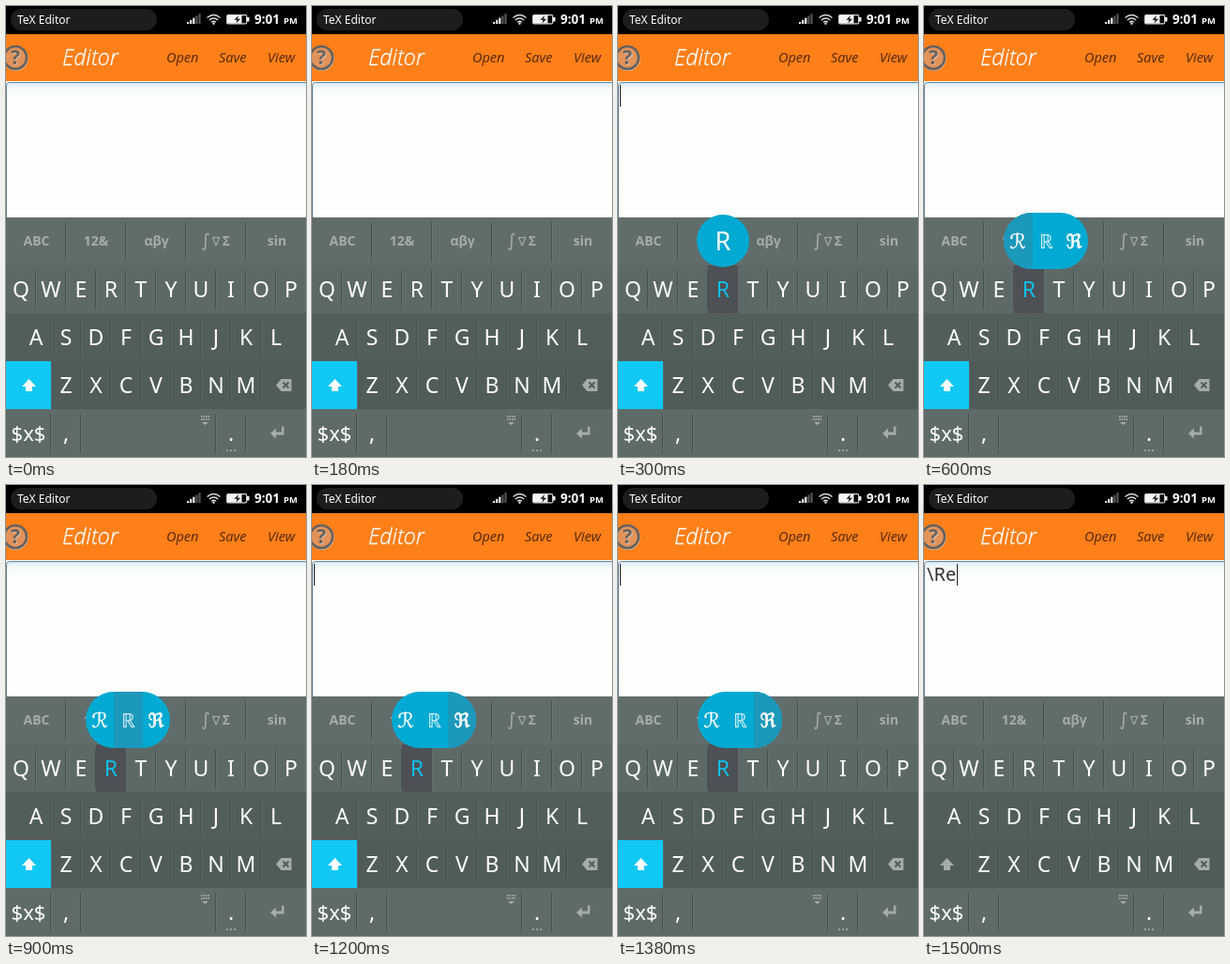
An HTML page that plays this animation: 320 px wide and 480 px high, repeating every 1.8 s.

```html
<!DOCTYPE html>
<html lang="en">
<head>
<meta charset="utf-8">
<title>TeX Editor keyboard</title>
<style>
  html, body { margin: 0; width: 100%; height: 100%; overflow: hidden; background: #000; }
  svg { display: block; width: 320px; height: 480px; }
  text { font-family: "Fira Sans", "Noto Sans", "Open Sans", sans-serif; fill: #fff; white-space: pre; }
  .mid { text-anchor: middle; }
  .key { font-size: 23px; }
  .tab { font-size: 14px; font-weight: 600; fill: #a4adac; }
  .menu { font-size: 14.5px; font-weight: 500; font-style: italic; fill: #5b2c08; }
  .title { font: italic 300 23.5px "Fira Sans", "Open Sans", sans-serif; stroke: #fff; stroke-width: .3; }
  .math { font-family: "DejaVu Sans", sans-serif; }
</style>
</head>
<body>
<svg id="stage" viewBox="0 0 320 480" xmlns="http://www.w3.org/2000/svg">
  <defs>
    <linearGradient id="inset" x1="0" y1="0" x2="0" y2="1">
      <stop offset="0" stop-color="#dcebf6"/>
      <stop offset=".04" stop-color="#f3f9fc"/>
      <stop offset=".1" stop-color="#fdfefd"/>
      <stop offset="1" stop-color="#fffefc"/>
    </linearGradient>
    <clipPath id="pill"><rect x="85" y="220" width="90" height="60" rx="30"/></clipPath>
  </defs>

  <!-- status bar -->
  <rect width="320" height="30" fill="#000"/>
  <rect x="5" y="3" width="156" height="23" rx="11.5" fill="#1d1d1d"/>
  <text x="12" y="19" font-size="12">TeX Editor</text>
  <g id="signal"></g>
  <g fill="none" stroke="#d8d8d8" stroke-width="1.4">
    <path d="M214.5 12.5q7-6 14 0M216.8 15q4.7-4 9.4 0M219 17.3q2.5-2 5 0"/>
    <circle cx="221.5" cy="18.6" r=".6"/>
    <rect x="235.7" y="9.7" width="21" height="9.2" rx="1.2" stroke-width="1.2"/>
  </g>
  <path d="M236 10h15.500v8.500h-15.500zM257 12h2.500v4.500h-2.500z" fill="#f4f4f4"/>
  <path d="M248 10l-4.500 4.700h3l-1 3.800 4.500-4.700h-3z" fill="#111"/>
  <text x="265" y="19" font-size="13.5" font-weight="600">9:01</text>
  <text x="296" y="19" font-size="9.5" font-weight="600">PM</text>

  <!-- header -->
  <rect y="30" width="320" height="50" fill="#ff7f19"/>
  <circle cx="10.5" cy="55.8" r="12.3" fill="none" stroke="#d5b79d" stroke-width="2"/>
  <circle cx="10" cy="55" r="12" fill="#e2935a" stroke="#65625f" stroke-width="2.6"/>
  <text class="mid" x="11" y="63" font-size="21" font-weight="700" style="fill:#dcbfa8">?</text>
  <text class="mid" x="10" y="62" font-size="21" font-weight="700" style="fill:#65625f">?</text>
  <text class="title" x="60" y="63">Editor</text>
  <text class="menu" x="171" y="60">Open</text>
  <text class="menu" x="227" y="60">Save</text>
  <text class="menu" x="279" y="60">View</text>

  <!-- text area -->
  <rect y="80" width="320" height="145" fill="#fffefc"/>
  <rect x=".5" y="81.5" width="330" height="148" rx="3" fill="url(#inset)" stroke="#64839e"/>
  <text id="typed" x="3" y="102" font-size="20" style="fill:#333">\Re</text>
  <rect id="caret" y="84" width="1" height="23" fill="#222"/>

  <g id="keys"></g>

  <!-- shift -->
  <rect id="shiftOn" y="378" width="48" height="51" fill="#11c8f4"/>
  <path id="shift" d="M24.5 397l7.5 8h-4v5h-7v-5h-4z"/>

  <!-- pressed key -->
  <g id="pressed">
    <rect x="96" y="276" width="32" height="51" fill="#4d5054"/>
    <text class="key mid" x="112" y="310" style="fill:#10bfea">R</text>
  </g>
  <g id="bubble">
    <circle cx="112" cy="250" r="28" fill="#00aad2"/>
    <text class="mid" x="112" y="260" font-size="27">R</text>
  </g>
  <g id="variants">
    <g clip-path="url(#pill)">
      <rect x="85" y="220" width="90" height="60" fill="#00aad2"/>
      <rect id="choice" y="220" width="31" height="60" fill="#1c98bb"/>
    </g>
    <text class="math mid" x="100" y="258" font-size="22" stroke="#fff" stroke-width=".3">ℛ</text>
    <text class="math mid" x="130.5" y="258" font-size="21" font-weight="200" opacity=".85">ℝ</text>
    <text class="math mid" x="160" y="258" font-size="21" stroke="#fff" stroke-width=".6">ℜ</text>
  </g>
</svg>
<script>
const $ = id => document.getElementById(id);

function add(parent, tag, attrs, text) {
  const el = document.createElementNS("http://www.w3.org/2000/svg", tag);
  for (const k in attrs) el.setAttribute(k, attrs[k]);
  if (text) el.textContent = text;
  parent.appendChild(el);
  return el;
}

const keys = $("keys");
const muted = "#a4adac";
const box = (x, y, width, height, fill, parent = keys) =>
  add(parent, "rect", { x, y, width, height, fill });
const label = (s, x, y, cls = "key") => add(keys, "text", { class: cls + " mid", x, y }, s);

function divider(x, top) {
  box(x - 1, top + 5, 1, 42, "#46514f");
  box(x, top + 5, 1, 42, "rgba(255,255,255,.06)");
}

// Each row: top, height, colour, divider positions
const span = (from, to, step) =>
  Array.from({ length: Math.floor((to - from) / step) + 1 }, (_, i) => from + i * step);
const rows = [
  [225, 51, "#616d6b", span(64, 256, 64)],
  [276, 51, "#5d6967", span(32, 288, 32)],
  [327, 51, "#525e5c", span(48, 272, 32)],
  [378, 51, "#505c5a", span(48, 272, 32)],
  [429, 51, "#5f6b69", [48, 80, 224, 256]]
];
for (const [top, height, fill, xs] of rows) {
  box(0, top, 320, height, fill);
  xs.forEach(x => divider(x, top));
}

["QWERTYUIOP", "ASDFGHJKL", "ZXCVBNM"].forEach((line, r) =>
  [...line].forEach((c, i) => label(c, (r ? 32 * r : 16) + 32 * i, 310 + 51 * r)));
label("$x$", 24, 463).style.fontSize = "22px";
label(",", 64, 463);
label(".", 240, 463);

label("ABC", 32.5, 255, "tab");
label("12&", 96, 255, "tab");
label("αβγ", 160.5, 255, "tab");
label("sin", 289, 255, "tab");
label("∫", 213, 256, "tab math").style.cssText = "font-size:19px;font-weight:400";
label("∇", 224, 255, "tab math").style.cssText = "font-size:13px;font-weight:400";
label("Σ", 235, 255, "tab");

// Small key icons
const icon = (d, fill = muted) => add(keys, "path", { d, fill });
icon("M288 403.5l5.5-6.500h11v13h-11z");
add(keys, "path", { d: "M295.5 400.5l6 6m0-6l-6 6", stroke: "#505c5a", "stroke-width": 2 });
icon("M282 455l6-5.500v4h6v-6h2.500v9h-8.500v4z");
for (let i = 0; i < 8; i++) box(208 + 2.5 * (i % 4), 436 + 3 * (i >> 2), 1.5, 1.8, muted);
icon("M209 443h7l-3.5 3z");
for (let i = 0; i < 3; i++) box(235 + 4 * i, 472, 2, 2, "#98a2a1");

for (let i = 0; i < 5; i++) {
  const h = 2 + 2.2 * i;
  box(193 + 3.1 * i, 19 - h, 2.2, h, i < 3 ? "#e8e8e8" : "#555", $("signal"));
}

// Hard steps: caret x (-1 hides it), bubble, chosen variant (-1 hides them), typed
const STEP = 300;
const steps = [
  { caret: -1, bubble: false, choice: -1, typed: false },
  { caret: 2, bubble: true, choice: -1, typed: false },
  { caret: -1, bubble: false, choice: 0, typed: false },
  { caret: -1, bubble: false, choice: 1, typed: false },
  { caret: 2, bubble: false, choice: 2, typed: false },
  { caret: 35, bubble: false, choice: -1, typed: true }
];
const show = (id, on) => { $(id).style.display = on ? "" : "none"; };

function draw(t) {
  const s = steps[Math.floor(t / STEP) % steps.length];
  show("caret", s.caret >= 0);
  $("caret").setAttribute("x", s.caret);
  show("bubble", s.bubble);
  show("variants", s.choice >= 0);
  $("choice").setAttribute("x", 85 + 30 * s.choice);
  show("pressed", s.bubble || s.choice >= 0);
  show("typed", s.typed);
  show("shiftOn", !s.typed);
  $("shift").setAttribute("fill", s.typed ? muted : "#fff");
}

const start = performance.now();
function tick() {
  draw(performance.now() - start);
  requestAnimationFrame(tick);
}
tick();
</script>
</body>
</html>
```
